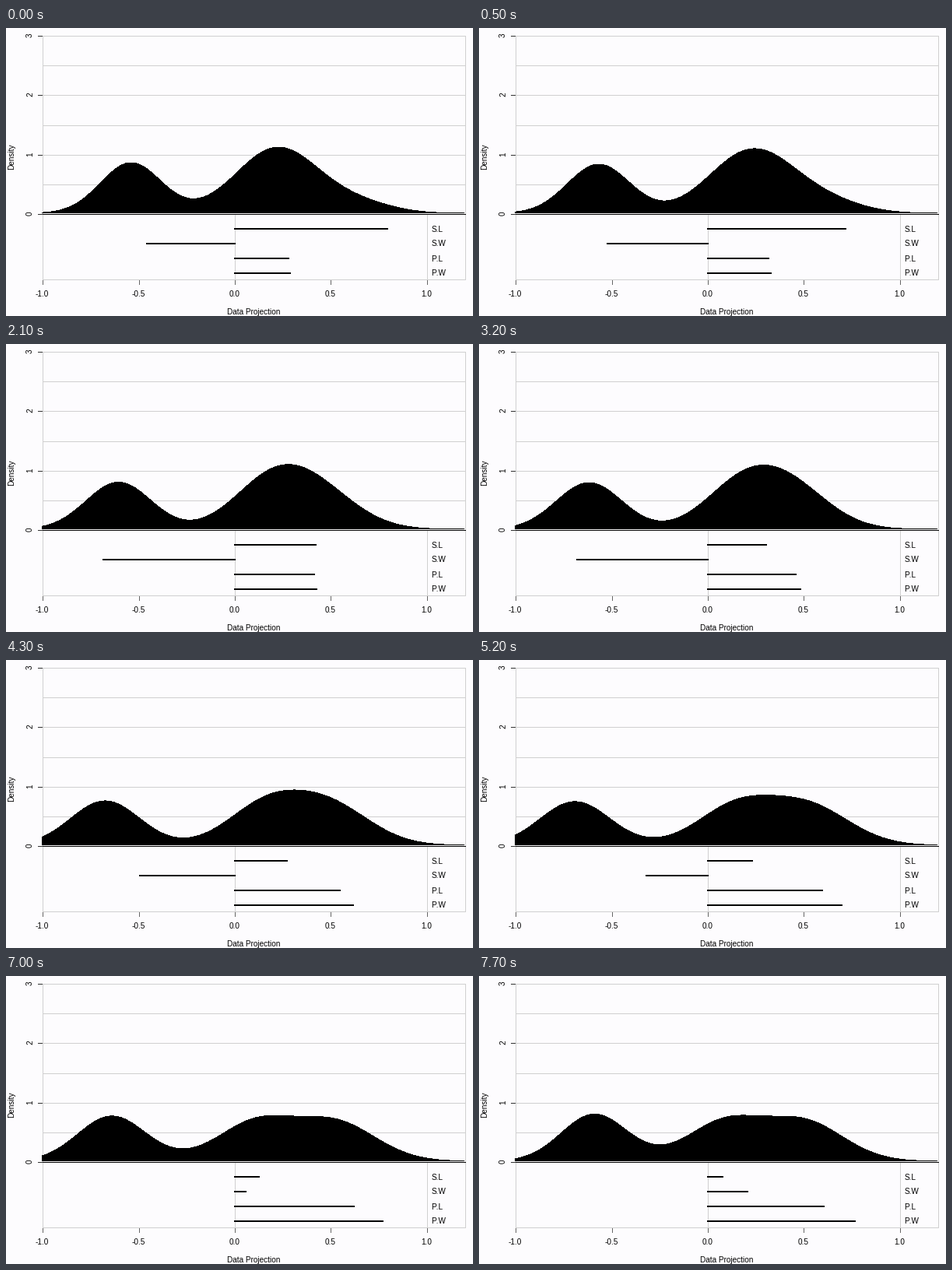
Animation, 600 px wide and 370 px high, one loop 8000 ms. Source, as a matplotlib script:

```python
import numpy as np
import matplotlib.pyplot as plt
from matplotlib.animation import FuncAnimation

W, H = 600, 370
X0, UX = 293, 247            # pixel of x = 0 and pixels per unit
Y0, UY = 238, 229 / 3        # pixel of y = 0 and pixels per unit
LEFT, RIGHT, TOP, BOTTOM = 46, 589, 9, 322
GREY = "#d0d0d0"
STEP_MS, FRAMES = 100, 80

# Iris as five groups of flowers: size and mean, scaled to unit ranges
SPAN = np.array([3.6, 2.4, 5.9, 2.4])
COUNT = np.array([50, 4, 46, 38, 12])
MEANS = np.array([[5.01, 3.43, 1.46, 0.25],
                  [5.00, 2.30, 3.28, 1.03],
                  [6.02, 2.81, 4.35, 1.35],
                  [6.31, 2.93, 5.32, 2.02],
                  [7.48, 3.12, 6.30, 2.05]]) / SPAN
WEIGHT = COUNT / COUNT.sum()
MEANS -= WEIGHT @ MEANS
SPREAD = np.array([.11, .16, .055, .075])    # deviation within a group
RHO = 0.3                                    # correlation within a group
SIZE = np.array([.65, 1, 1, 1, 1])           # the first group is tighter
HALF_RANGE = 0.892                           # largest distance from the centre


def unit(*v):
    v = np.array(v)
    return v / np.linalg.norm(v)


# The tour runs along two great circles with a rest in between
START = unit(.795, -.455, .280, .290)
CORNER = unit(.320, -.715, .435, .450)
RESUME = unit(.308, -.680, .461, .487)
END = unit(.081, .210, .607, .770)


def slerp(a, b, u):
    u = np.clip(u, 0, 1)
    ang = np.arccos(a @ b)
    return (np.sin((1 - u) * ang) * a + np.sin(u * ang) * b) / np.sin(ang)


def projection(frame):
    if frame < 32:
        return slerp(START, CORNER, frame / 26)
    return slerp(RESUME, END, (frame - 32) / 45)


def density(v, x):
    mu = MEANS @ v / HALF_RANGE
    s = SPREAD * v / HALF_RANGE
    var = SIZE ** 2 * (RHO * s.sum() ** 2 + (1 - RHO) * (s @ s))
    sd = np.sqrt(WEIGHT @ (mu ** 2 + var))
    var = var + (0.9 * sd * COUNT.sum() ** -0.2) ** 2    # kernel bandwidth
    z = (x[:, None] - mu) ** 2 / var
    return (np.exp(-z / 2) / np.sqrt(2 * np.pi * var)) @ WEIGHT


plt.rcParams["font.family"] = "Liberation Sans"
plt.rcParams["text.kerning_factor"] = 6
fig = plt.figure(figsize=(W / 72, H / 72), dpi=72, facecolor="#fdfcfe")
ax = fig.add_axes([0, 0, 1, 1])
ax.set_xlim(0, W)
ax.set_ylim(H, 0)
ax.axis("off")


def line(x1, y1, x2, y2, color=GREY, z=1):
    """One-pixel line through the given pixel centres."""
    ax.plot([x1 + .5, x2 + .5], [y1 + .5, y2 + .5], color=color, lw=1,
            solid_capstyle="projecting", antialiased=False, zorder=z)


def label(x, y, text, ha="center", rotation=0):
    ax.text(x, y, text, size=10, ha=ha, va="baseline", color="black",
            rotation=rotation, rotation_mode="anchor")


# Grid, frame and axes
for k in range(7):
    y = round(Y0 - k * UY / 2)
    line(LEFT, y, RIGHT, y)
for x in (X0, X0 + UX):
    line(x, Y0, x, BOTTOM)
for x in (LEFT, RIGHT):
    line(x, TOP, x, BOTTOM)
line(LEFT, BOTTOM, RIGHT, BOTTOM)
line(LEFT, Y0, RIGHT, Y0, "black", 4)

for k in range(-2, 3):
    x = round(X0 + k * UX / 2)
    line(x, BOTTOM + 1, x, BOTTOM + 6, "#666666")
    label(x + .5, 345, f"{k / 2:.1f}")
for k in range(4):
    y = round(Y0 - k * UY)
    line(LEFT - 6, y, LEFT - 1, y, "#333333")
    label(34, y + .5, str(k), rotation=90)
label(318.5, 368.5, "Data Projection")
label(10.5, 165, "Density", rotation=90)

# Density shape and loading bars
px = np.arange(LEFT, RIGHT + 1)
grid = (px - X0) / UX
shape, = ax.fill([0], [0], color="black", lw=0, antialiased=False, zorder=3)
bars = []
for i, name in enumerate(["S.L", "S.W", "P.L", "P.W"]):
    y = round(Y0 + .5 + (i + 1) * UY / 4)
    bar, = ax.plot([X0, X0], [y, y], color="black", lw=2,
                   solid_capstyle="projecting", zorder=4)
    bars.append(bar)
    label(546.5, y + 3.5, name, ha="left")


def draw(frame):
    v = projection(frame)
    top = Y0 - UY * density(v, grid)
    base = [[RIGHT, Y0], [LEFT, Y0]]
    shape.set_xy(np.vstack([np.column_stack([px, top]), base]))
    for bar, load in zip(bars, v):
        bar.set_xdata([X0 + .5, X0 + .5 + load * UX])
    return [shape, *bars]


anim = FuncAnimation(fig, draw, frames=FRAMES, interval=STEP_MS,
                     repeat=True, repeat_delay=0)
plt.show()
```
